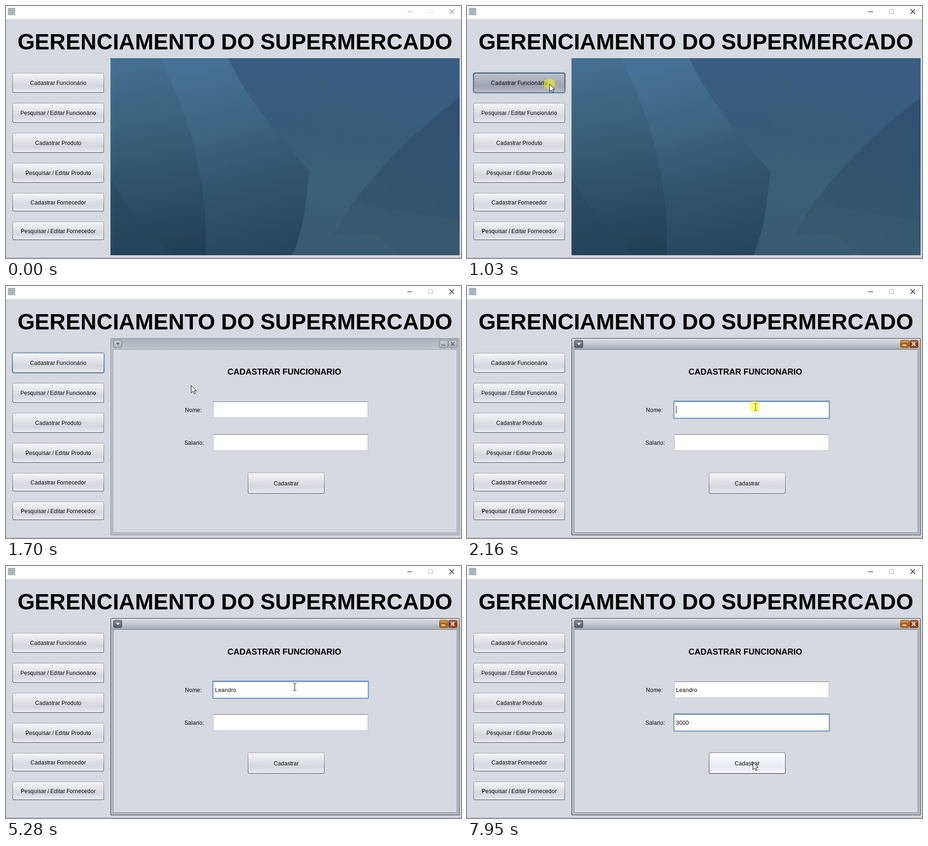
These frames come from a looping animation (984 by 546 pixels, 8 s). An HTML page with a canvas:

```html
<!DOCTYPE html>
<html lang="pt">
<head>
<meta charset="utf-8">
<style>
  html, body { margin: 0; width: 100%; height: 100%; overflow: hidden; background: #d6d9df; }
  canvas { display: block; }
</style>
</head>
<body>
<canvas width="984" height="546"></canvas>
<script>
const ctx = document.querySelector('canvas').getContext('2d');
const LOOP = 8000;
const ACTIVATE = 970, OPEN = 1100, FOCUS_NAME = 2160, FOCUS_PAY = 5660;

const menu = [
  ['Cadastrar Funcionário', 145, 43], ['Pesquisar / Editar Funcionário', 210, 43],
  ['Cadastrar Produto', 275, 43], ['Pesquisar / Editar Produto', 340, 43],
  ['Cadastrar Fornecedor', 405, 40], ['Pesquisar / Editar Fornecedor', 467, 40]
];
// start, step length, steps, from, to
const moves = [
  [70, 70, 12, [905, 560], [178, 169]],
  [1300, 68, 12, [178, 169], [622, 261]],
  [5330, 66, 5, [622, 261], [567, 342]],
  [7600, 70, 6, [567, 342], [618, 425]]
];
const clicks = [[ACTIVATE, OPEN], [FOCUS_NAME, 2250], [FOCUS_PAY, 5740]];
const caretOn = [[FOCUS_NAME, 2650], [2790, 4260], [4710, 5280], [FOCUS_PAY, 6200], [6530, 7600]];
const typedName = { text: 'Leandro', keys: [2790, 3060, 3260, 3320, 3460, 3660, 3720] };
const typedPay = { text: '3000', keys: [6530, 6680, 6880, 7140] };

const within = (t, spans) => spans.some(([a, b]) => t >= a && t < b);
const typed = ({ text, keys }, t) => text.slice(0, keys.filter(k => t >= k).length);

function gradient(x0, y0, x1, y1, colors) {
  const g = ctx.createLinearGradient(x0, y0, x1, y1);
  colors.forEach((c, i) => g.addColorStop(i / (colors.length - 1), c));
  return g;
}
const vertical = (y, h, ...colors) => gradient(0, y, 0, y + h, colors);

function rect(x, y, w, h, fill, r = 0) {
  ctx.fillStyle = fill;
  ctx.beginPath();
  ctx.roundRect(x, y, w, h, r);
  ctx.fill();
}

function shape(path, fill) {
  ctx.fillStyle = fill;
  ctx.fill(new Path2D(path));
}

function line(path, color, width = 1) {
  ctx.strokeStyle = color;
  ctx.lineWidth = width;
  ctx.stroke(new Path2D(path));
}

// Glyphs advance by whole pixels, as in hinted desktop text.
function text(str, x, y, { size = 12, weight = 400, centered = false } = {}) {
  ctx.font = `${weight} ${size}px "Liberation Sans", Arial, sans-serif`;
  ctx.fillStyle = '#000';
  const advances = [...str].map(ch => Math.round(ctx.measureText(ch).width));
  const width = advances.reduce((sum, a) => sum + a, 0);
  if (centered) x = Math.round(x - width / 2);
  [...str].forEach((ch, i) => {
    ctx.fillText(ch, x, y);
    x += advances[i];
  });
  return width;
}

function cursorAt(t) {
  let pos = moves[0][3];
  for (const [start, dt, steps, a, b] of moves) {
    if (t < start) break;
    const p = Math.min(1, (Math.floor((t - start) / dt) + 1) / steps);
    const e = p * p * (3 - 2 * p);
    pos = a.map((v, i) => Math.round(v + (b[i] - v) * e));
  }
  return pos;
}

const inside = ([px, py], x, y, w, h) => px >= x && px < x + w && py >= y && py < y + h;

function button(label, x, y, w, h, mouse, focused, pressed) {
  const hover = inside(mouse, x, y, w, h);
  if (focused) rect(x - 1.6, y - 1.6, w + 3.2, h + 3.2, '#73a4d1', 5.5);
  rect(x, y, w, h, pressed ? vertical(y, h, '#101722', '#4d5765')
    : hover ? vertical(y, h, '#6d7480', '#202830') : vertical(y, h, '#9b9ea5', '#7b8088', '#424b55'), 4);
  const colors = pressed ? ['#bcc1cc', '#adb2be', '#9fa4b1', '#b9bfca']
    : hover ? ['#ffffff', '#f2f3f7', '#e8eaf1', '#fafafd']
    : ['#f6f6f8', '#e5e6ea', '#d5d7dd', '#e9ebf0'];
  rect(x + 1, y + 1, w - 2, h - 2, vertical(y, h, ...colors), 3);
  text(label, x + w / 2, y + Math.ceil((h + 9) / 2), { centered: true });
}

function field(y, value, focused, caret) {
  if (focused) rect(446, y - 2, 339, 40, '#7ba3cf', 2);
  rect(448, y, 335, 36, focused ? '#a9b9cc' : '#b9bcc2');
  rect(449, y + 1, 333, 34, '#fff');
  rect(448, y, 335, 1, focused ? '#66788e' : '#85878c');
  rect(449, y + 1, 333, 1, '#d9dade');
  const width = text(value, 452, y + 23);
  if (focused && caret) rect(452 + width, y + 10, 1, 16, '#000');
}

function windowBar(active) {
  rect(0, 0, 984, 28, '#fff');
  rect(4, 4, 16, 16, '#a9b4bf');
  const ink = active ? '#000' : '#8f8f8f';
  rect(868, 12, 10, 1, ink);
  line('M913.5 7.5h9v9h-9z', active ? '#b4b4b4' : '#e4e4e4');
  line('M959 7l10 10M969 7l-10 10', ink, 1.1);
}

function wallpaper() {
  ctx.save();
  ctx.beginPath();
  ctx.rect(226, 113, 755, 427);
  ctx.clip();
  rect(226, 113, 755, 427, gradient(700, 113, 660, 540, ['#395d82', '#385d7c', '#3b6077', '#385a70']));
  shape('M658 140L880 280L745 415L655 330z', 'rgba(62,98,116,.2)');
  shape('M981 198C880 275 765 385 708 497L800 497L850 540L981 540z',
    gradient(960, 220, 800, 540, ['#305172', '#33546f', '#36576d']));
  shape('M755 428L981 465L981 540L850 540L708 497z', 'rgba(60,92,110,.25)');
  shape('M331 113L481 113C515 190 575 265 655 358C650 430 642 485 620 540L432 540C438 390 400 240 331 113z',
    gradient(440, 130, 550, 540, ['#467095', '#3d6481', '#30526c', '#27465f']));
  shape('M575 270L658 240L655 358z', 'rgba(59,95,120,.3)');
  shape('M226 113L331 113C400 240 438 390 432 540L226 540z',
    gradient(270, 113, 340, 540, ['#456f91', '#3b627d', '#2e5068', '#233f55']));
  shape('M226 373Q280 465 350 530L360 540L226 540z', 'rgba(40,72,94,.5)');
  ctx.restore();
}

function frameButton(x, colors, border) {
  rect(x, 117, 19, 17, border, 4);
  rect(x + 1, 118, 17, 15, vertical(118, 15, ...colors), 3);
}

function innerFrame(t, mouse) {
  const active = t >= FOCUS_NAME;
  const edge = active ? '#2c3036' : '#868a92';
  rect(226, 113, 755, 427, edge, [3, 3, 0, 0]);
  rect(227, 114, 753, 425, active ? '#bcc0c9' : '#bbbfc8', [2, 2, 0, 0]);
  rect(227, 114, 753, 23, active ? vertical(114, 23, '#dfe2e7', '#c2c6ce', '#a5a9b2')
    : vertical(114, 23, '#adb2ba', '#b6bac2', '#c0c4cb'), [2, 2, 0, 0]);
  rect(231, 137, 745, 398, active ? '#6e727a' : '#9a9ea6');
  rect(232, 138, 743, 396, '#d6d9df');

  const dull = ['#c9ccd2', '#adb1b9'];
  frameButton(232, active ? ['#858a94', '#5b606a'] : dull, active ? '#3d424b' : '#7c8088');
  frameButton(937, active ? ['#dda95c', '#a85f17', '#c87925'] : dull, active ? '#6b3d10' : '#7c8088');
  frameButton(957, active ? ['#bd7150', '#8b3512', '#a94e23'] : dull, active ? '#59240e' : '#7c8088');
  const ink = active ? '#fff' : '#696d75';
  shape('M238 123h8l-4 5z', ink);
  rect(942, 127, 8, 2, ink);
  line('M962.5 121.5l7 8M969.5 121.5l-7 8', ink, 2);

  text('CADASTRAR FUNCIONARIO', 479, 192, { size: 18, weight: 700 });
  text('Nome:', 387, 273);
  text('Salario:', 386, 344);
  const caret = within(t, caretOn);
  field(250, typed(typedName, t), active && t < FOCUS_PAY, caret);
  field(321, typed(typedPay, t), t >= FOCUS_PAY, caret);
  button('Cadastrar', 523, 404, 166, 46, mouse, false, false);
}

function pointer([x, y], overField, clicking) {
  if (clicking) {
    ctx.fillStyle = 'rgba(255,255,0,.5)';
    ctx.beginPath();
    ctx.arc(x, y, 12, 0, Math.PI * 2);
    ctx.fill();
  }
  ctx.save();
  ctx.translate(x, y);
  if (overField) {
    const ink = clicking ? '#5a3a10' : '#000';
    rect(2, -6, 1, 14, ink);
    for (const end of [-7, 8]) {
      rect(-1, end, 3, 1, ink);
      rect(3, end, 3, 1, ink);
    }
  } else {
    const arrow = 'M.5 .5V16.5L4.3 12.9L6.8 18.6L9.3 17.5L6.8 11.9H11.9z';
    shape(arrow, '#fff');
    line(arrow, '#000');
  }
  ctx.restore();
}

function draw(t) {
  const mouse = cursorAt(t);
  rect(0, 0, 984, 546, '#d6d9df');
  rect(0, 545, 984, 1, '#b0b3b8');
  windowBar(t >= ACTIVATE);
  text('GERENCIAMENTO DO SUPERMERCADO', 25, 94, { size: 48, weight: 700 });
  menu.forEach(([label, y, h], i) => {
    const chosen = i === 0 && t >= ACTIVATE;
    button(label, 14, y, 198, h, mouse, chosen && t < FOCUS_NAME, chosen && t < OPEN);
  });
  if (t < OPEN) wallpaper();
  else innerFrame(t, mouse);
  const overField = t >= OPEN && [250, 321].some(y => inside(mouse, 448, y, 335, 36));
  pointer(mouse, overField, within(t, clicks));
}

function tick() {
  draw(performance.now() % LOOP);
  requestAnimationFrame(tick);
}
tick();
</script>
</body>
</html>
```
